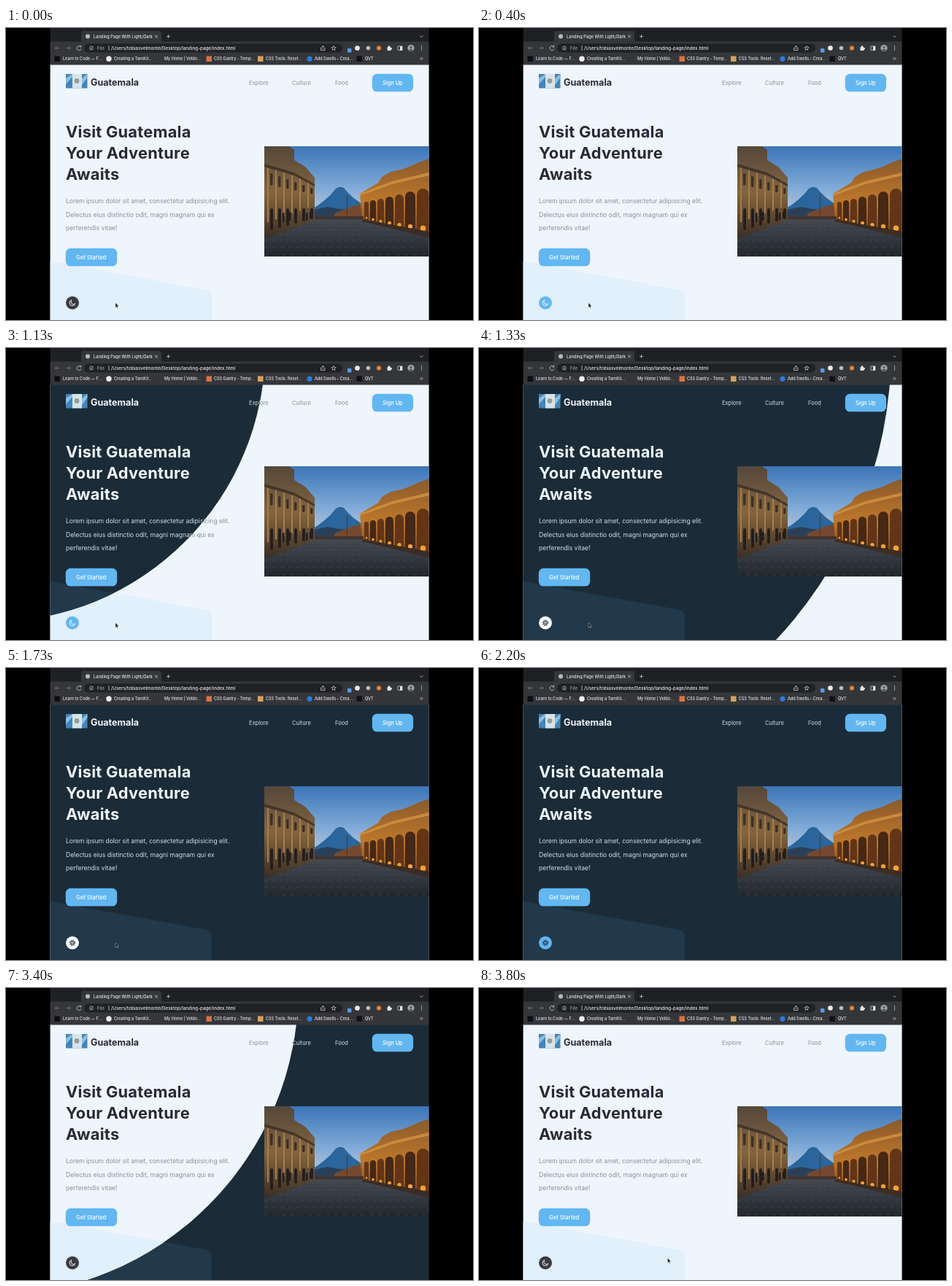
These frames come from a looping animation (640x400 px, 3860 ms). An HTML page:

```html
<!DOCTYPE html>
<html lang="en">
<head>
<meta charset="utf-8">
<title>Landing page theme switch</title>
<style>
  html, body { margin: 0; width: 100%; height: 100%; overflow: hidden; background: #000; }
  svg { display: block; width: 640px; height: 400px; }
  text { font-family: Inter, "Open Sans", sans-serif; white-space: pre; }
  .light { --bg: #eff5fd; --blob: #e1f0fa; --head: #292936; --body: #8d8e98; --icon: #fff; }
  .dark { --bg: #1b2c38; --blob: #21394a; --head: #f0f5fa; --body: #d6dde3; --icon: #1b2c38; }
  .head { letter-spacing: .25px; }
  .ui { fill: #e6e7ea; font-weight: 500; }
  .line { fill: none; stroke: #c9cacd; stroke-width: .8; }
</style>
</head>
<body>
<svg viewBox="0 0 640 400">
  <defs>
    <clipPath id="view"><rect x="60.6" y="50" width="519" height="350"/></clipPath>
    <clipPath id="wipe"><circle id="ring" cx="-20" cy="0" r="0"/></clipPath>
    <clipPath id="frame"><rect x="354" y="162" width="226" height="151"/></clipPath>
    <linearGradient id="sky" x2="0" y2="1">
      <stop offset="0" stop-color="#3c75b7"/><stop offset=".55" stop-color="#80abd8"/><stop offset="1" stop-color="#cbd0d6"/>
    </linearGradient>
    <linearGradient id="road" x2="0" y2="1">
      <stop offset="0" stop-color="#444850"/><stop offset=".4" stop-color="#373c44"/><stop offset="1" stop-color="#22262d"/>
    </linearGradient>
    <linearGradient id="stone" x2="0" y2="1">
      <stop offset="0" stop-color="#54473b"/><stop offset=".5" stop-color="#84653f"/><stop offset="1" stop-color="#3a2d24"/>
    </linearGradient>
    <linearGradient id="ochre" x2="0" y2="1">
      <stop offset="0" stop-color="#8a5a2c"/><stop offset=".55" stop-color="#bd772b"/><stop offset="1" stop-color="#7a451d"/>
    </linearGradient>
  </defs>
  <g clip-path="url(#view)">
    <g id="pages"></g>
    <g id="shared"></g>
  </g>
  <g id="chrome"></g>
  <path id="cursor" d="M0 0V6.2L1.5 4.9 2.5 7 3.5 6.5 2.5 4.5H4.4Z" fill="#111" stroke="#c4cad0" stroke-width=".5"/>
</svg>
<script>
const $ = id => document.getElementById(id);
const text = (x, y, size, str, fill, weight = 400, cls = '') =>
  `<text class="${cls}" x="${x}" y="${y}" font-size="${size}" font-weight="${weight}" style="fill:${fill}">${str}</text>`;
const rect = (x, y, w, h, fill, rx = 0) =>
  `<rect x="${x}" y="${y}" width="${w}" height="${h}" rx="${rx}" fill="${fill}"/>`;
const dot = (x, y, r, fill) => `<circle cx="${x}" cy="${y}" r="${r}" fill="${fill}"/>`;
const shape = (d, fill) => `<path d="${d}" fill="${fill}"/>`;
const line = d => `<path class="line" d="${d}"/>`;
const ui = (x, y, str, size = 5.7) => `<text class="ui" x="${x}" y="${y}" font-size="${size}">${str}</text>`;

const icons = {
  light: '<path d="M3.7 1A3.9 3.9 0 1 1-1-3.7 3.2 3.2 0 0 0 3.7 1Z"/>',
  dark: '<circle r="1.5"/><circle r="2.9"/><circle r="3.8" stroke-dasharray="1.5 1.484"/>'
};

function page(theme) {
  const nav = [['Explore', 333], ['Culture', 392], ['Food', 451]];
  const title = ['Visit Guatemala', 'Your Adventure', 'Awaits'];
  const copy = ['Lorem ipsum dolor sit amet, consectetur adipisicing elit.',
    'Delectus eius distinctio odit, magni magnam qui ex', 'perferendis vitae!'];
  return `<g id="${theme}" class="${theme}">
    <rect x="60" y="50" width="520" height="350" style="fill:var(--bg)"/>
    <path d="M60 319.5 274 358.5Q282 360 282 368V400H60Z" style="fill:var(--blob)"/>
    ${text(116, 79.3, 12.6, 'Guatemala', 'var(--head)', 700)}
    ${nav.map(([s, x]) => text(x, 77.8, 7.5, s, 'var(--body)')).join('')}
    ${title.map((s, i) => text(82, 150.3 + i * 28.7, 21.8, s, 'var(--head)', 700, 'head')).join('')}
    ${copy.map((s, i) => text(82, 240.3 + i * 18.4, 8.52, s, 'var(--body)')).join('')}
    <circle id="${theme}Btn" cx="91" cy="376.5" r="9"/>
    <g transform="translate(91 376.5)" fill="none" stroke-width=".9" stroke-linejoin="round"
      style="stroke:var(--icon)">${icons[theme]}</g></g>`;
}

function photo() {
  let s = rect(354, 162, 226, 104, 'url(#sky)');
  s += shape('M418 249Q440 236 452 220Q457 216 463 219Q474 234 494 244V266H418Z', '#2b659b');
  s += shape('M418 250 440 245 465 249 494 243V266H418Z', '#2a4058');
  s += shape('M450 254 470 246 490 240V266H450Z', '#74482f');
  s += shape('M354 286 424 261H490L580 284V313H354Z', 'url(#road)');
  // cobbles thin out towards the horizon
  for (let i = 0; i < 9; i++) {
    const y = 265 + i * i * .72, half = 32 + i * 12;
    s += `<path d="M${Math.max(354, 457 - half)} ${y}H${457 + half}" stroke="#596069" stroke-width=".8"
      stroke-dasharray="${2 + i * .4} ${2 + i * .6}" opacity=".45"/>`;
  }
  // left facade with windows and pilasters
  s += shape('M354 162H388L395 167V181L410 190 417 198 423 205V263L354 289Z', 'url(#stone)');
  for (let i = 0; i < 6; i++) {
    const x = 358 + i * 11, h = 30 - i * 3;
    s += rect(x, 190 + i * 4, 2, 76 - i * 8, '#a57d49');
    s += rect(x + 4, 199 + i * 4, 3.5, h * .55, '#3d3026', 1.5);
    s += rect(x + 4, 277 - h - i * 3, 4, h, '#261f1b', 2);
  }
  s += shape('M354 186 395 198 423 214V217L395 202 354 190Z', '#43362a');
  // right arcade
  s += shape('M485 227 510 212 515 204 527 197 541 194 553 190 566 184 580 179V284L488 263Z', 'url(#ochre)');
  s += shape('M485 227 529 210 580 198V202L529 214 485 230Z', '#cb8b3e');
  [[491, 6, 238], [499, 8, 236], [509, 9, 234], [520, 11, 231], [533, 12, 228], [547, 14, 224], [563, 17, 220]]
    .forEach(([x, w, y], i) => {
      const base = 264 + i * 2.4, r = w / 2;
      s += shape(`M${x} ${base}V${y + r}A${r} ${r} 0 0 1 ${x + w} ${y + r}V${base}Z`, i % 2 ? '#452815' : '#633517');
      s += dot(x + r, base - 4, r * .45, '#eda23c');
    });
  s += shape('M488 262 580 279V287L488 265Z', '#3b2c24');
  // passers-by and lamp post
  [374, 379, 388, 411, 416].forEach((x, i) => s += rect(x, 252 + i % 2, 2.4, 15 - i * 1.5, '#1d1e23', 1));
  s += rect(467, 229, .8, 34, '#333843');
  s += rect(424, 258, 66, 4, '#40342e');
  return `<g clip-path="url(#frame)">${s}</g>`;
}

function shared() {
  const blue = '#62b7f1';
  return rect(82, 63, 29.5, 19.5, '#4385ba') + rect(91, 63, 13, 19.5, '#dbe3e7') +
    shape('M82 69 91 63V67L82 77ZM104 69 111.5 63V68L104 78Z', '#8cbfe2') + dot(97, 72.5, 3.4, '#929f9f') +
    rect(501.8, 62.8, 56.3, 24.5, blue, 6.5) + text(516, 77.8, 7.4, 'Sign Up', '#fff', 500) +
    rect(81.8, 301.8, 70.4, 24.5, blue, 6.5) + text(96, 316.9, 7.6, 'Get Started', '#fff', 500) + photo();
}

function chrome() {
  let s = rect(60.6, 0, 519, 19, '#1f2024') + rect(60.6, 18.5, 519, 32, '#35363a');
  s += shape('M100 19Q103 19 103 16V8Q103 4 107 4H209Q213 4 213 8V16Q213 19 216 19Z', '#35363a');
  s += dot(112, 11.5, 3, '#b9bbc0') + ui(120, 13.6, 'Landing Page With Light/Dark');
  s += line('M204 9.5l4 4m0-4l-4 4M220 11.5h5m-2.5-2.5v5M567.5 10.5l2 2 2-2');
  s += rect(107, 21.5, 354, 12, '#202124', 6);
  s += `<g opacity=".45">${line('M73.5 27.5h-6m2.5-2.5l-2.5 2.5 2.5 2.5M82 27.5h6m-2.5-2.5l2.5 2.5-2.5 2.5')}</g>`;
  s += line('M102.3 25.5A3 3 0 1 0 103 28.3M102.8 23.7v2.3h-2.3');
  s += `<circle class="line" cx="117" cy="27.5" r="2.4"/>` + line('M117 27v1.8M141 24v7');
  s += `<g opacity=".65">${ui(125, 29.6, 'File', 5.9)}</g>` +
    ui(144, 29.6, '/Users/tobiasvelmonte/Desktop/landing-page/index.html', 6.25);
  s += line('M432.5 27h-1v3.5h5.5V27h-1M434.3 29v-4.5m-1.5 1.5l1.5-1.5 1.5 1.5');
  s += line('M449 24.5l.9 2 2.2.2-1.7 1.4.5 2.2-1.9-1.2-1.9 1.2.5-2.2-1.7-1.4 2.2-.2Z');
  s += rect(468, 28, 5.5, 5.5, '#5f97e8', 1) + dot(481.5, 27.5, 3.3, '#eee') + dot(496.5, 27.5, 2.8, '#b9babd') +
    dot(511, 27.5, 3, '#e8853a') + rect(522.5, 26, 5, 5, '#e4e5e8', 1) + dot(525, 25.6, 1.3, '#e4e5e8') +
    dot(527.8, 28.2, 1.2, '#e4e5e8');
  s += line('M537 25h6v5.5h-6Z') + rect(540, 25, 3, 5.5, '#e4e5e8') + dot(555, 27.5, 4.6, '#a5a6a8') +
    dot(555, 26.3, 1.5, '#54565a') + shape('M552 30.5Q555 26.5 558 30.5Q555 33 552 30.5Z', '#54565a');
  [25, 27.5, 30].forEach(y => s += dot(569.5, y, .7, '#d7d8da'));
  [[78, 'Learn to Code — F...'], [148, 'Creating a TarnKit...'], [217, 'My Home | Veldo...'],
   [285, 'CSS Gantry - Temp...'], [356, 'CSS Tools: Reset...'], [423, 'Add Swells – Crea...'], [492, 'QVT']]
    .forEach(([x, str]) => s += ui(x, 44.1, str, 5.5));
  s += rect(66.5, 38.5, 7.5, 7.5, '#0c0d16') + dot(141, 42.2, 3.7, '#f2f2f2') + rect(274.5, 38.5, 7.5, 7.5, '#d9743e') +
    rect(345, 38.5, 7.5, 7.5, '#d9a15c') + dot(416, 42.2, 3.5, '#2c7be0') + rect(480.5, 38.5, 7.5, 7.5, '#111');
  return s + line('M567.5 40.3l1.7 1.7-1.7 1.7m2.2-3.4l1.7 1.7-1.7 1.7');
}

$('pages').innerHTML = page('light') + page('dark');
$('shared').innerHTML = shared();
$('chrome').innerHTML = chrome();

const LOOP = 3860, TO_DARK = 810, TO_LIGHT = 3094, REACH = 755;
const progress = (t, start, length) => Math.min(1, Math.max(0, (t - start) / length));

// cubic-bezier(.25, .1, .25, 1)
function ease(x) {
  const curve = (u, a, b) => 3 * (1 - u) ** 2 * u * a + 3 * (1 - u) * u * u * b + u ** 3;
  let lo = 0, hi = 1;
  for (let i = 0; i < 20; i++) {
    const mid = (lo + hi) / 2;
    if (curve(mid, .25, .25) < x) lo = mid; else hi = mid;
  }
  return curve(hi, .1, 1);
}

const mix = (a, b, k) => `rgb(${a.map((v, i) => Math.round(v + (b[i] - v) * k))})`;
const BLUE = [98, 183, 241], INK = [58, 58, 66], WHITE = [250, 252, 255];

function draw(now) {
  const t = now % LOOP, darkening = t < TO_LIGHT;
  const top = $(darkening ? 'dark' : 'light'), base = $(darkening ? 'light' : 'dark');
  if ($('pages').lastElementChild !== top) $('pages').append(top);
  base.removeAttribute('clip-path');
  top.setAttribute('clip-path', 'url(#wipe)');
  const k = darkening ? progress(t, TO_DARK, 1100) : progress(t, TO_LIGHT, 950);
  $('ring').setAttribute('r', REACH * (k && ease(k)));
  $('lightBtn').setAttribute('fill', mix(INK, BLUE, darkening ? ease(progress(t, 130, 270)) : 0));
  $('darkBtn').setAttribute('fill', mix(WHITE, BLUE, ease(progress(t, 1860, 340))));
  const late = t >= 3660;
  $('cursor').setAttribute('visibility', t < 1860 || late ? 'visible' : 'hidden');
  $('cursor').setAttribute('transform', late ? 'translate(258.5 370)' : 'translate(150 376.5)');
  requestAnimationFrame(draw);
}
requestAnimationFrame(draw);
</script>
</body>
</html>
```
